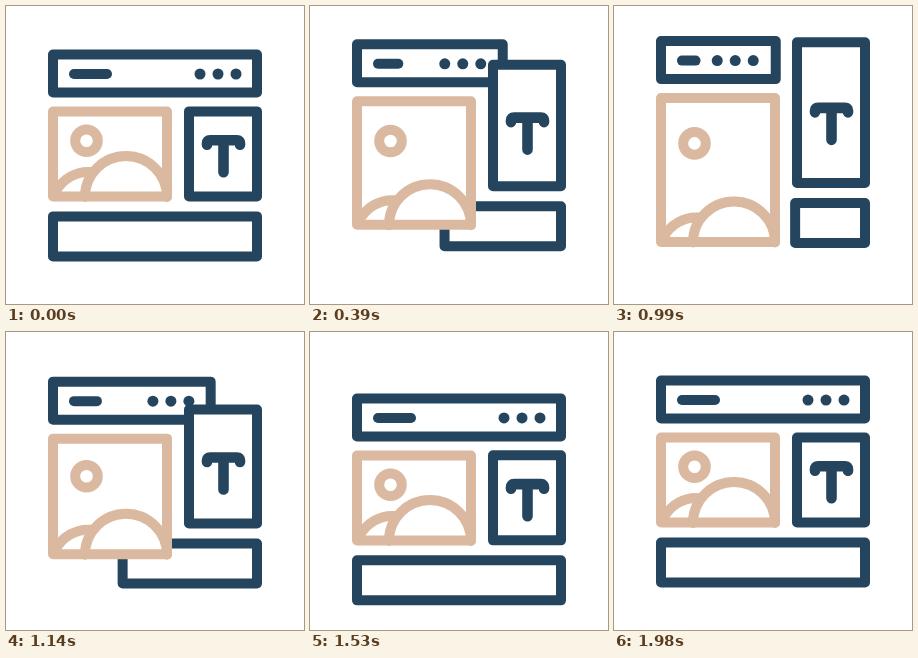
Recreate the animation shown at these times as an HTML page. Size 298 by 298 pixels, loop 2250 ms.

```html
<!DOCTYPE html>
<html lang="en">
<head>
<meta charset="utf-8">
<title>Layout icon</title>
<style>
  html, body { margin: 0; width: 100%; height: 100%; overflow: hidden; background: #fff; }
  svg { display: block; width: 100vw; height: 100vh; }
  g { fill: #fff; stroke-width: 10; stroke-linecap: round; stroke-linejoin: round; }
  .navy { stroke: #25455f; }
  .tan { stroke: #dab9a0; }
  .open { fill: none; }
  .dots { fill: #25455f; stroke: none; }
  #letter { stroke-width: 10.6; }
</style>
</head>
<body>
<svg viewBox="0 0 298 298">
  <g id="icon">
    <g class="navy">
      <rect id="header" x="47" y="48.5" height="38"/>
      <path id="title"/>
      <g id="dots" class="dots">
        <circle cx="194" cy="68" r="5.5"/>
        <circle cx="212" cy="68" r="5.5"/>
        <circle cx="230" cy="68" r="5.5"/>
      </g>
      <rect id="footer" y="210.4" height="40"/>
      <rect id="textBox" x="183" width="68"/>
      <path id="letter" class="open" d="M201 138.7v-1.5q0-3 3-3h27q3 0 3 3v1.5M217.5 134.2V166.2"/>
    </g>
    <g class="tan">
      <rect id="photo" x="47" y="105.5" width="114"/>
      <circle id="sun" cx="80.5" cy="134.8" r="11.3"/>
      <path id="hills" class="open" d="M49 187A37 37 0 0 1 85 166.1M79 191A41 41 0 0 1 161 191"/>
    </g>
  </g>
</svg>
<script>
const LOOP = 2250, STEP = 30;
const $ = id => document.getElementById(id);

// Cubic-bezier easing with y handles at 0 and 1.
function ease(x1, x2) {
  return t => {
    let lo = 0, hi = 1;
    for (let i = 0; i < 24; i++) {
      const s = (lo + hi) / 2, r = 1 - s;
      const x = 3 * r * r * s * x1 + 3 * r * s * s * x2 + s * s * s;
      if (x < t) lo = s; else hi = s;
    }
    return lo * lo * (3 - 2 * lo);
  };
}

const quick = ease(.333, .2), soft = ease(.333, .3);
const cubic = t => t < .5 ? 4 * t ** 3 : 1 - 4 * (1 - t) ** 3;

// Each leg: start ms, end ms, from, to, easing.
const bob = [
  [150, 750, 0, -17.8, soft],
  [750, 1515, -17.8, 18, cubic],
  [1515, 2000, 18, 0, quick]
];
const morph = [
  [150, 750, 0, 1, quick],
  [975, 1495, 1, 0, quick]
];

function valueAt(legs, t) {
  let v = legs[0][2];
  for (const [start, end, from, to, fn] of legs) {
    if (t <= start) break;
    v = t >= end ? to : from + (to - from) * fn((t - start) / (end - start));
  }
  return v;
}

function set(id, attrs) {
  for (const key in attrs) $(id).setAttribute(key, attrs[key]);
}
const move = (id, x, y) => set(id, { transform: `translate(${x} ${y})` });

function draw(t) {
  const m = valueAt(morph, t);
  move('icon', 0, valueAt(bob, t));
  set('header', { width: 204 - 89.5 * m });
  set('title', { d: `M68 68H${101 - 19.5 * m}` });
  move('dots', -91 * m, 0);
  set('footer', { x: 47 + 134.5 * m, width: 204 - 134.5 * m });
  set('textBox', { y: 105.4 - 56 * m, height: 85 + 56 * m });
  move('letter', 0, -19 * m);
  set('photo', { height: 85 + 59 * m });
  move('sun', 0, 16 * m);
  move('hills', 0, 59 * m);
}

const begin = performance.now();
function tick() {
  const t = (performance.now() - begin) % LOOP;
  draw(Math.floor(t / STEP) * STEP);
  requestAnimationFrame(tick);
}
tick();
</script>
</body>
</html>
```
